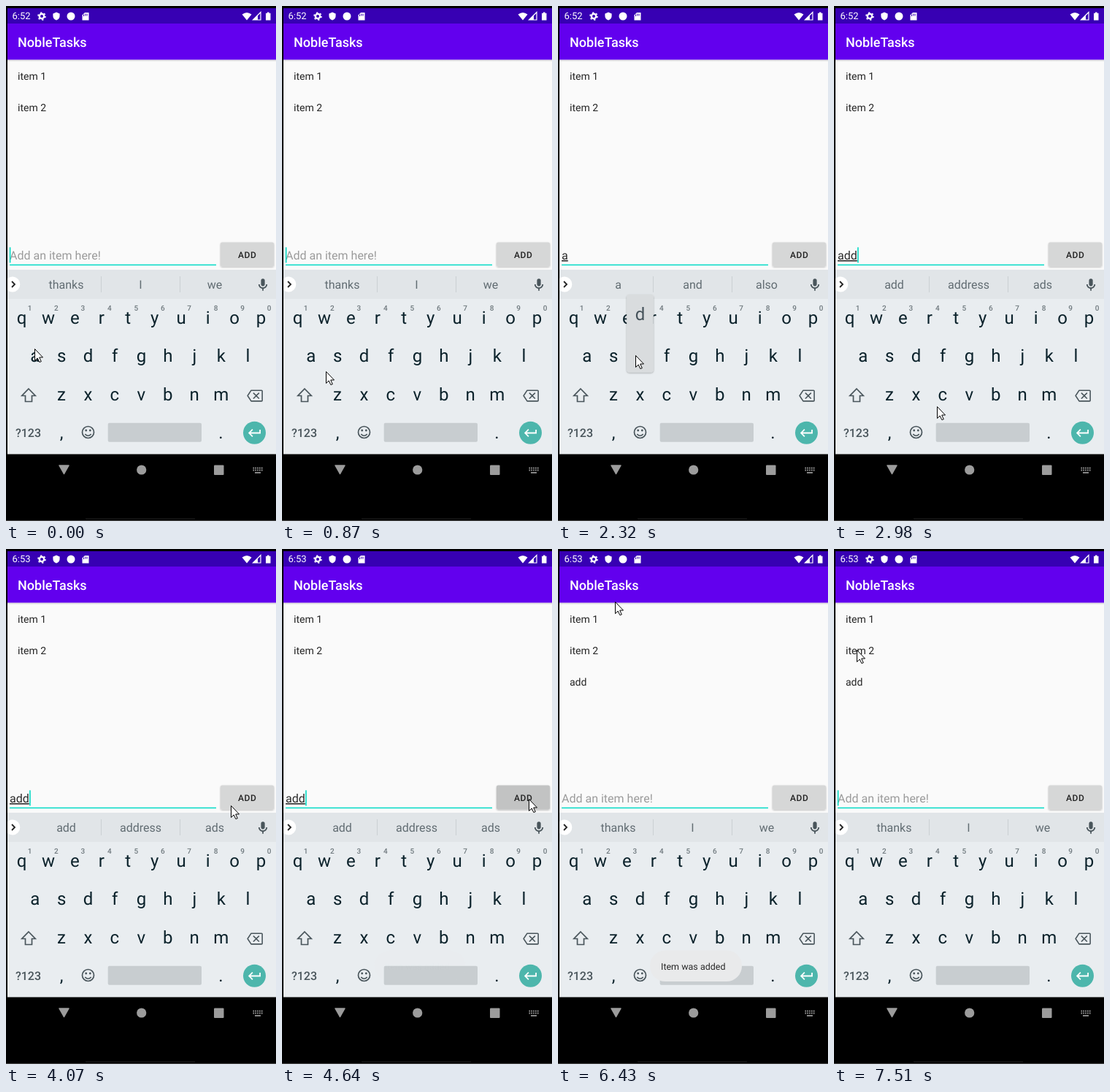
Recreate the animation shown at these times as an HTML page. Size 370x705 px, loop 8000 ms.

```html
<!DOCTYPE html>
<html lang="en">
<head>
<meta charset="utf-8">
<title>To-do list</title>
<style>
  html, body { margin: 0; width: 100%; height: 100%; overflow: hidden; background: #000; }
  svg { display: block; width: 370px; height: 705px; font-family: Roboto, Arial, sans-serif; }
  text { text-rendering: geometricPrecision; }
  .mid { text-anchor: middle; }
  .key { font-size: 24px; fill: #0b222b; }
  .digit { font-size: 10px; fill: #6f797e; font-weight: 500; }
  .word { font-size: 16px; fill: #616c72; }
  .item { font-size: 14px; fill: #242424; }
  .line { fill: none; stroke: #49555b; stroke-width: 1.7; }
  .icon { fill: #49555b; }
</style>
</head>
<body>
<svg viewBox="0 0 370 705">
  <defs>
    <filter id="soft" x="-30%" y="-30%" width="160%" height="160%">
      <feDropShadow dx="0" dy="1" stdDeviation="1.2" flood-opacity=".3"/>
    </filter>
    <linearGradient id="shade" x2="0" y2="1">
      <stop stop-color="#d2d2d2"/><stop offset="1" stop-color="#fafafa"/>
    </linearGradient>
  </defs>

  <!-- app -->
  <rect width="370" height="705"/>
  <rect x="2" y="73" width="368" height="288" fill="#fafafa"/>
  <rect x="2" y="73.5" width="368" height="3" fill="url(#shade)"/>
  <rect x="2" y="3" width="368" height="21" fill="#3700b3"/>
  <rect x="2" y="24" width="368" height="49.5" fill="#6200ee"/>
  <text x="16" y="56" font-size="18" font-weight="500" fill="#fff">NobleTasks</text>

  <!-- status bar -->
  <g fill="#fff">
    <text id="clock" x="8.5" y="18" font-size="13"></text>
    <circle cx="49" cy="14" r="3.2" fill="none" stroke="#fff" stroke-width="2.4"/>
    <circle cx="49" cy="14" r="5" fill="none" stroke="#fff" stroke-width="1.6" stroke-dasharray="2.2 3.036"/>
    <path d="M69 8.5l4.6 2v3.2q0 4-4.6 5.8q-4.6-1.8-4.6-5.8v-3.2z"/>
    <circle cx="89" cy="14" r="5.5"/>
    <path d="M108 9h5.5v10.5h-9v-7z"/>
    <path d="M106.5 11.5v2.5M108.8 10.5v3M111 10.5v3" stroke="#3700b3"/>
    <path d="M323.5 11.5q6.5-5 13 0L330 19.5z"/>
    <path d="M349 8.5v10.5h-10.5z" fill="none" stroke="#fff" stroke-width="1.2"/>
    <path d="M345 12.5v6.5h-6.5z"/>
    <path d="M356 9.8h2V8.5h2.5v1.3h2v9.700H356z"/>
  </g>

  <!-- list and input -->
  <g class="item">
    <text x="16" y="101">item 1</text>
    <text x="16" y="144">item 2</text>
    <text id="added" x="16" y="187">add</text>
  </g>
  <text id="hint" x="5" y="347" font-size="16" fill="#9b9b9b">Add an item here!</text>
  <text id="typed" x="5" y="347" font-size="16" fill="#2a2a2a" text-decoration="underline"></text>
  <rect x="5" y="353.7" width="283" height="1.5" fill="#03dac5"/>
  <rect id="caret" y="330.3" width="1.6" height="21.2" fill="#03dac5"/>
  <rect id="button" x="294" y="323.5" width="73" height="33" rx="2" filter="url(#soft)"/>
  <text class="mid" x="330.7" y="345" font-size="12" font-weight="500" letter-spacing=".5" fill="#222">ADD</text>

  <!-- keyboard -->
  <rect x="2" y="361" width="368" height="252.5" fill="#e9edf0"/>
  <rect x="2" y="361" width="368" height="40" fill="#e1e5e8"/>
  <path d="M2 373a10.500 10.500 0 1 1 0 16z" fill="#fff"/>
  <path d="M8 377l4 4l-4 4" fill="none" stroke="#222" stroke-width="1.8"/>
  <path d="M130.5 370v22M238.5 370v22" stroke="#cbd0d3"/>
  <g id="words" class="word mid">
    <text x="82.5" y="387"></text><text x="184.5" y="387"></text><text x="286" y="387"></text>
  </g>
  <path class="icon" transform="translate(341.6 371.4) scale(.87)" d="M12 14c1.700 0 3-1.300 3-3V5a3 3 0 0 0-6 0v6c0 1.700 1.300 3 3 3zM17 11a5 5 0 0 1-10 0H5c0 3.500 2.600 6.400 6 6.900V21h2v-3.100c3.400-.5 6-3.400 6-6.900z"/>
  <g id="keys" class="mid"></g>
  <path class="line" d="M31 524l9.200 9.500h-4.700v8h-9v-8h-4.700z"/>
  <g class="line" transform="translate(330 522.5) scale(.92)" stroke-linejoin="round">
    <path d="M6.500 4H22q1 0 1 1v14q0 1-1 1H6.500L1.200 12zM9.700 7.700l8.600 8.600M18.300 7.700l-8.600 8.600"/>
  </g>
  <text class="mid" x="30.5" y="589.5" font-size="16" font-weight="500" fill="#49555b">?123</text>
  <circle class="line" cx="112.5" cy="583.5" r="8"/>
  <path class="line" d="M108.300 586q4.200 4.500 8.400 0"/>
  <circle class="icon" cx="109.7" cy="581" r="1.4"/>
  <circle class="icon" cx="115.3" cy="581" r="1.4"/>
  <rect x="139.7" y="570.7" width="128.3" height="26" rx="2" fill="#c8cdd0"/>
  <circle cx="340.5" cy="584.3" r="15.5" fill="#4db6ac"/>
  <path transform="translate(330.1 573.7) scale(.9)" d="M19 7v4H5.800l3.600-3.600L8 6l-6 6l6 6l1.400-1.400L5.800 13H21V7z" fill="#fff"/>
  <g id="popup" class="mid">
    <rect x="-18.3" y="395" width="36.6" height="106.5" rx="4" fill="#d9dcde" filter="url(#soft)"/>
    <text y="430" font-size="24" fill="#45525a"></text>
  </g>

  <!-- navigation -->
  <g fill="#9c9c9c">
    <path d="M73 629h13l-6.500 11.500z" stroke="#9c9c9c" stroke-width="1.5" stroke-linejoin="round"/>
    <circle cx="185.7" cy="635" r="6.6"/>
    <rect x="285" y="628.5" width="13.5" height="13.5" rx="1"/>
    <path d="M338.500 632.500h13M338.500 635.500h13" stroke="#9c9c9c" stroke-width="2" stroke-dasharray="1.6 1.25"/>
    <rect x="341" y="638" width="8" height="1.7"/>
  </g>
  <path d="M109 702h150" stroke="#222"/>
  <path d="M0 704.500h370" stroke="#444"/>

  <g id="toast">
    <rect x="126" y="549.5" width="126" height="42.5" rx="21" fill="#e9eaeb"/>
    <text x="141" y="575.5" font-size="12.5" fill="#2a2a2a">Item was added</text>
  </g>
  <path id="mouse" d="M.5.5V16.500L4.200 13L6.800 18.500L9.300 17.700L6.700 12H11.500z" fill="#fff" stroke="#000"/>
</svg>

<script>
const $ = id => document.getElementById(id);
const LOOP = 8000, CLICK = 4640, ADDED = 4760, BLINK = 480, HOLD = 120;

// Mouse strokes: start, end, x, y. It rests between them.
const home = [39, 469];
const moves = [
  [0, 240, 53, 486], [510, 750, 70, 510], [750, 1110, 41, 480], [1810, 2170, 106, 478],
  [2740, 2980, 141, 548], [2980, 3250, 183, 572], [3250, 3520, 189, 586], [3800, 4070, 308, 351],
  [4070, 4340, 338, 342], [4790, 5180, 245, 206], [5180, 5450, 204, 318], [5450, 5880, 194, 247],
  [5880, 6150, 96, 139], [6280, 6430, 78, 72], [6430, 7090, 65, 138], [7090, 7360, 38, 152],
  [7360, 7510, 31, 138]
];
const strokes = [[1540, 'a'], [2440, 'd'], [2710, 'd']];
const words = [
  [0, 'thanks I we'], [1780, 'a and also'], [2440, 'ad and as'],
  [2710, 'add address ads'], [ADDED, 'thanks I we']
];
const keyX = { a: 39.7, d: 112.5 };

function key(x, y, text, cls = 'key') {
  return `<text class="${cls}" x="${x}" y="${y}">${text}</text>`;
}
function row(letters, x, y, cls) {
  return [...letters].map((c, i) => key(x + i * 36.45, y, c, cls)).join('');
}
$('keys').innerHTML =
  row('qwertyuiop', 21.5, 434.5) + row('1234567890', 32.5, 417, 'digit') +
  row('asdfghjkl', 39.7, 487) + row('zxcvbnm', 76, 540) +
  key(76, 591.5, ',') + key(294.5, 591.5, '.');

const clamp = v => Math.min(1, Math.max(0, v));
const show = (id, on) => $(id).setAttribute('visibility', on ? 'visible' : 'hidden');

function mouseAt(t) {
  let [x, y] = home;
  for (const [start, end, toX, toY] of moves) {
    const p = clamp((t - start) / (end - start));
    x += (toX - x) * p;
    y += (toY - y) * p;
  }
  return [Math.round(x), Math.round(y)];
}

function draw(now) {
  const t = now % LOOP;
  const done = strokes.filter(s => s[0] <= t);
  const text = t < ADDED ? done.map(s => s[1]).join('') : '';
  const down = strokes.find(([time]) => t >= time - HOLD && t < time);

  $('clock').textContent = t < 4070 ? '6:52' : '6:53';
  $('typed').textContent = text;
  show('hint', !text);
  show('added', t >= ADDED);

  // Typing restarts the blink.
  const lit = done.length ? done.at(-1)[0] : -330;
  show('caret', Math.floor((t - lit) / BLINK) % 2 === 0);
  $('caret').setAttribute('x', 4.8 + 9.1 * text.length);

  $('button').setAttribute('fill', t >= CLICK && t < ADDED ? '#c2c3c3' : '#d6d7d7');
  words.findLast(w => w[0] <= t)[1].split(' ')
    .forEach((w, i) => $('words').children[i].textContent = w);

  show('popup', down);
  if (down) {
    $('popup').setAttribute('transform', `translate(${keyX[down[1]]})`);
    $('popup').lastElementChild.textContent = down[1];
  }
  $('toast').setAttribute('opacity', clamp((t - CLICK) / 350) * clamp((7090 - t) / 550));
  $('mouse').setAttribute('transform', `translate(${mouseAt(t)})`);
  requestAnimationFrame(draw);
}
draw(0);
</script>
</body>
</html>
```
